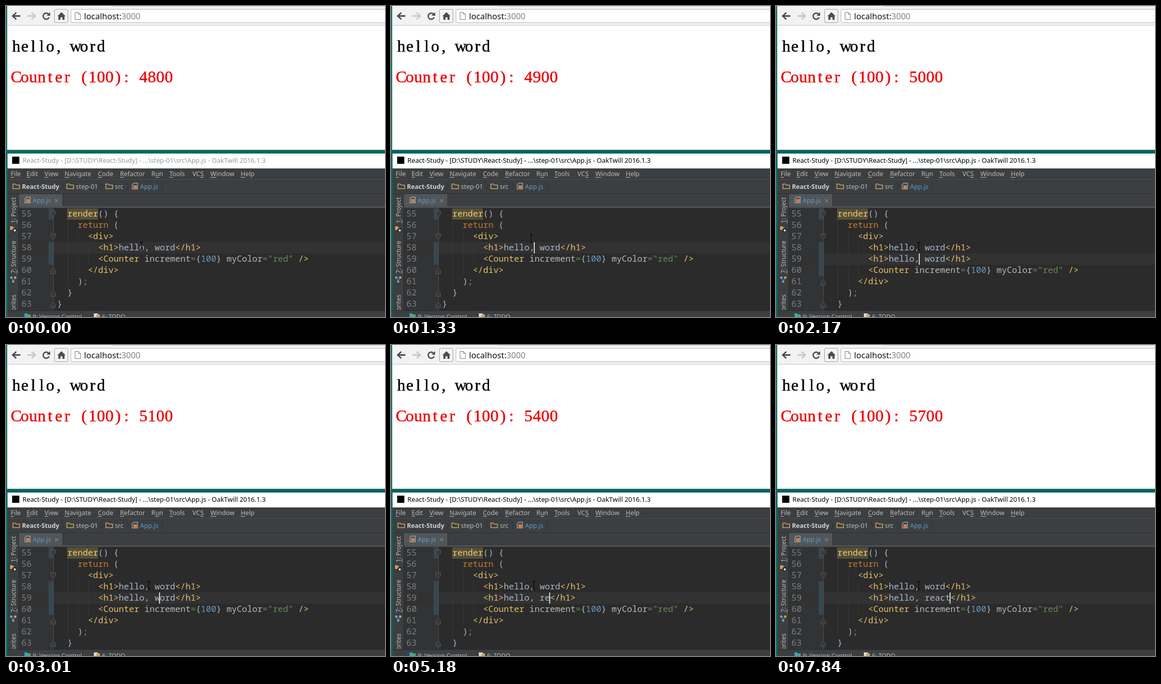
An HTML page with a canvas for the animation above (8 s loop, 738x607 px).

```html
<!DOCTYPE html>
<html lang="en">
<head>
<meta charset="utf-8">
<title>Live reload</title>
<style>
  html, body { margin: 0; width: 100%; height: 100%; overflow: hidden; }
  canvas { display: block; }
</style>
</head>
<body>
<canvas id="stage" width="738" height="607"></canvas>
<script>
const ctx = document.getElementById('stage').getContext('2d');
const LOOP = 8000, STEP = 70;
const UI = '"Noto Sans", sans-serif', MONO = '"Noto Sans Mono", monospace';
const ROW = 22, TOP = 395, COL = 10, LEFT = 100;
const FOCUS = 1330, DUPLICATE = 2170;

const counterTimes = [700, 1610, 2520, 3430, 4270, 5180, 6090, 6930, 7840];
const caretTimes = [2870, 3010, 3150, 3290, 3360];
const words = [[0, 'word'], [3850, 'wor'], [4060, 'wo'], [4200, 'w'], [4410, ''],
  [4900, 'r'], [5110, 're'], [5810, 'rea'], [6090, 'reac'], [6440, 'react']];
const mousePath = [[0, 264, 468], [140, 264, 468], [350, 205, 250], [490, 150, 85], [560, 143, 56],
  [630, 143, 56], [700, 179, 110], [910, 200, 200], [1190, 262, 425], [1400, 278, 469], [LOOP, 278, 469]];

const INK = { tag: '#e8bf6a', text: '#a9b7c6', key: '#cc7832', fn: '#ffc66d',
  attr: '#bababa', num: '#6897bb', str: '#6a8759' };

const passed = (times, t) => times.filter(at => at <= t).length;

function rect(x, y, w, h, fill) {
  ctx.fillStyle = fill;
  ctx.fillRect(x, y, w, h);
}

function text(str, x, y, fill, font) {
  ctx.font = font;
  ctx.fillStyle = fill;
  ctx.fillText(str, x, y);
  return ctx.measureText(str).width;
}

function path(d, x, y, { fill, stroke, width = 1 }) {
  const p = new Path2D(d);
  ctx.save();
  ctx.translate(x, y);
  if (fill) { ctx.fillStyle = fill; ctx.fill(p); }
  if (stroke) { ctx.strokeStyle = stroke; ctx.lineWidth = width; ctx.stroke(p); }
  ctx.restore();
}

// Label with one underlined mnemonic letter
function label(str, x, y, mark, size = 12.4) {
  const font = size + 'px ' + UI;
  text(str, x, y, '#bbbbbb', font);
  const from = ctx.measureText(str.slice(0, mark)).width;
  rect(x + from, y + 2, ctx.measureText(str[mark]).width, 1, '#bbbbbb');
}

function sideLabel(str, y, mark) {
  ctx.save();
  ctx.translate(19, y);
  ctx.rotate(-Math.PI / 2);
  label(str, 0, 0, mark, 11.7);
  ctx.restore();
}

// Fixed pitch serif lettering, one glyph centred in each cell
function heading(str, y, fill) {
  ctx.textAlign = 'center';
  ctx.strokeStyle = fill;
  ctx.lineWidth = 0.5;
  [...str].forEach((ch, i) => {
    const x = 20 + i * 16.5;
    text(ch, x, y, fill, '32px "Liberation Serif", serif');
    ctx.strokeText(ch, x, y);
  });
  ctx.textAlign = 'left';
}

function folder(x) {
  path('M.5 2.5H5L7 4.500H13.500V11.500H.5Z', x, 345, { stroke: '#c9a36a', width: 1.6 });
}

function scriptIcon(x, y) {
  path('M4 .7H11.300V12.300H.7V4Z', x, y, { stroke: '#8fa3ad', width: 1.4 });
  rect(x + 3, y + 5, 7, 6, '#e07b39');
}

function browser(t) {
  rect(0, 0, 738, 39, '#f2f2f2');
  rect(0, 0, 210, 1, '#fafafa');
  rect(208, 0, 530, 1, '#d6c8c8');
  rect(0, 37, 738, 1, '#cfcfcf');
  rect(0, 39, 738, 242, '#ffffff');

  path('M7 0L0 6.500L7 13M1 6.500H15', 13, 13, { stroke: '#4d4d4d', width: 2.8 });
  path('M8 0L15 6.500L8 13M14 6.500H0', 42, 13, { stroke: '#c8c8c8', width: 2.8 });
  path('M12 3A6 6 0 1 0 13 9', 71, 13, { stroke: '#4d4d4d', width: 2.6 });
  path('M15 -1V6H8Z', 71, 13, { fill: '#4d4d4d' });
  path('M3 .5H24Q26.500 .5 26.500 3V24Q26.500 26.500 24 26.500H3Q.5 26.500 .5 24V3Q.5 .5 3 .5Z',
    94, 6, { fill: '#f4f4f4', stroke: '#a0a0a0' });
  path('M8 0L16 8H14V15H10V10H6V15H2V8H0Z', 100, 12, { fill: '#4d4d4d' });
  path('M620 .5H3Q.5 .5 .5 3V24Q.5 26.500 3 26.500H620', 126, 6, { fill: '#ffffff', stroke: '#b8b8b8' });
  path('M.5 .5H7L11 4.500V14.500H.5ZM7 .5V4.500H11', 134, 12, { stroke: '#777777' });
  const w = text('localhost:', 152, 26, '#111111', '16.2px ' + UI);
  text('3000', 152 + w, 26, '#808080', '16.2px ' + UI);

  heading('hello, word', 89, '#000000');
  heading('Counter (100): ' + (4800 + 100 * passed(counterTimes, t)), 149, '#f00000');
}

function frame(t) {
  const focused = t >= FOCUS;
  const teal = focused ? '#046361' : '#0b6b5a';
  rect(0, 281, 738, 7, teal);
  rect(3, 280, 735, 1, '#b9cfcb');
  rect(0, 0, 2, 607, '#0a6f62');
  rect(2, 0, 1, 281, '#b5cfca');
  rect(2, 281, 1, 326, teal);

  rect(3, 288, 735, 29, '#ffffff');
  rect(12, 294, 14, 14, '#000000');
  text('React-Study - [D:\\STUDY\\React-Study] - ...\\step-01\\src\\App.js - OakTwill 2016.1.3',
    32, 306, focused ? '#000000' : '#999999', '12.8px ' + UI);

  rect(3, 317, 735, 290, '#3c3f41');
  const menu = [['File', 9], ['Edit', 40], ['View', 75], ['Navigate', 114], ['Code', 179], ['Refactor', 222],
    ['Run', 283, 1], ['Tools', 318], ['VCS', 363, 2], ['Window', 398], ['Help', 457]];
  for (const [name, x, mark = 0] of menu) label(name, x, 332, mark);
  rect(3, 339, 735, 1, '#555555');
  rect(3, 340, 735, 1, '#2e3032');

  [13, 118, 194].forEach(folder);
  scriptIcon(245, 345);
  text('React-Study', 31, 357, '#d0d0d0', 'bold 12.2px ' + UI);
  text('step-01', 136, 357, '#bbbbbb', '12.4px ' + UI);
  text('src', 212, 357, '#bbbbbb', '12.4px ' + UI);
  text('App.js', 261, 357, '#5a9bcf', '12.4px ' + UI);
  for (const x of [108, 185, 235, 302]) path('M0 0L4 7L0 14', x, 345, { stroke: '#2b2d2f' });
  rect(3, 366, 735, 1, '#2e3032');
}

function sideBar() {
  rect(24, 367, 1, 227, '#2b2b2b');
  sideLabel('1: Project', 424, 0);
  path('M0 0H5L6 2H8V7H0Z', 8, 430, { fill: '#c9a36a' });
  rect(13, 434, 7, 7, '#1d1d1d');
  rect(15, 436, 4, 4, '#d8d8d8');
  sideLabel('7: Structure', 522, 0);
  path('M3 3L7 10L11 3M3 3H7', 7, 527, { stroke: '#9a9a9a' });
  rect(8, 528, 4, 4, '#5aa7d6');
  rect(16, 528, 4, 4, '#d9a45b');
  rect(12, 536, 4, 4, '#5aa7d6');
  ctx.save();
  ctx.beginPath();
  ctx.rect(3, 550, 21, 43);
  ctx.clip();
  sideLabel('2: Favorites', 626, 0);
  ctx.restore();
}

function codeRows(t, word) {
  const title = w => [8, 'tag', '<h1>', 'text', 'hello, ' + w, 'tag', '</h1>'];
  return [
    [2, 'fn', 'render', 'text', '() {'],
    [4, 'key', 'return', 'text', ' ('],
    [6, 'tag', '<div>'],
    title('word'),
    ...(t >= DUPLICATE ? [title(word)] : []),
    [8, 'tag', '<Counter ', 'attr', 'increment', 'str', '=', 'text', '{', 'num', '100', 'text', '} ',
      'attr', 'myColor', 'str', '="red"', 'tag', ' />'],
    [6, 'tag', '</div>'],
    [4, 'text', ')', 'key', ';'],
    [2, 'text', '}'],
    [0, 'text', '}'],
  ];
}

function foldMark(row, closing) {
  const y = TOP + row * ROW;
  const d = closing ? 'M.5 4.500L5 .5L9.500 4.500V10.500H.5ZM3 7H7' : 'M.5 .5H9.500V6.500L5 10.500L.5 6.500ZM3 4H7';
  path(d, 87, y + (closing ? 7 : 5), { fill: '#313335', stroke: '#5c5e60' });
}

function editor(t) {
  const shift = t >= DUPLICATE ? 1 : 0;
  const word = words.filter(([at]) => at <= t).pop()[1];
  const font = '16.667px ' + MONO;

  rect(25, 367, 85, 24, '#515658');
  rect(110, 367, 1, 24, '#2b2d2f');
  rect(25, 391, 713, 3, '#4e5254');
  scriptIcon(36, 372);
  text('App.js', 52, 384, '#5a9bcf', '12.4px ' + UI);
  path('M0 0L6 6M6 0L0 6', 95.5, 377, { stroke: '#7f8385', width: 1.2 });

  rect(25, 394, 713, 200, '#2b2b2b');
  rect(25, 394, 68, 200, '#313335');
  const activeY = TOP + (3 + shift) * ROW;
  rect(25, activeY, 713, ROW, '#323232');
  rect(83, TOP, 9, ROW, '#374752');
  rect(83, TOP + 3 * ROW, 9, (2 + shift) * ROW, '#374752');
  rect(92, TOP, 1, 199, '#4c4f51');

  rect(120, 417, 1, (6 + shift) * ROW, '#373737');
  rect(140, 439, 1, (4 + shift) * ROW, '#373737');
  rect(160, 461, 1, (2 + shift) * ROW, '#373737');
  rect(119, TOP, 60, ROW, '#52503a');

  codeRows(t, word).forEach(([indent, ...spans], row) => {
    const y = TOP + row * ROW + 15.5;
    if (row < 9) text(String(55 + row), 30, y, '#7b7e80', font);
    let x = LEFT - 0.5 + indent * COL;
    for (let i = 0; i < spans.length; i += 2) {
      text(spans[i + 1], x, y, INK[spans[i]], font);
      x += spans[i + 1].length * COL;
    }
  });

  foldMark(0);
  foldMark(2);
  [5, 7, 8].forEach(row => foldMark(row + shift, true));

  if (t >= 6370 && t < 6790) {
    ctx.beginPath();
    for (let x = 289; x <= 329; x += 2) ctx.lineTo(x, x % 4 === 1 ? 504.5 : 502.5);
    ctx.strokeStyle = '#659c6b';
    ctx.lineWidth = 1;
    ctx.stroke();
  }
  if (t >= FOCUS) {
    const col = t < 3850 ? 18 + passed(caretTimes, t) : 19 + word.length;
    rect(LEFT + col * COL - 2, activeY, 2, ROW, '#d0d0d0');
  }
}

function statusBar() {
  rect(3, 594, 735, 13, '#3c3f41');
  rect(3, 594, 735, 1, '#2b2b2b');
  rect(36, 600, 6, 7, '#3f9fd0');
  rect(42, 602, 6, 5, '#4eab68');
  label('9: Version Control', 52, 610, 0, 11.5);
  path('M0 0H7L10 3V8H0Z', 171, 600, { fill: '#d8d8d8' });
  rect(176, 602, 7, 5, '#c9a36a');
  label('6: TODO', 187, 610, 0, 11.5);
}

function pointer(t) {
  const now = Math.floor(t / STEP) * STEP;
  const i = mousePath.findIndex(([at]) => at > now);
  const [t0, x0, y0] = mousePath[i - 1], [t1, x1, y1] = mousePath[i];
  const k = (now - t0) / (t1 - t0);
  const x = Math.round(x0 + (x1 - x0) * k), y = Math.round(y0 + (y1 - y0) * k);
  if (y > TOP) {
    path('M-3 -7.500H-1L0 -6.500L1 -7.500H3M0 -6.500V6.500M-3 7.500H-1L0 6.500L1 7.500H3', x, y,
      { stroke: '#0c0c0c', width: 1.3 });
  } else {
    path('M.5 .5V16.500L4 13L6.500 18.500L9 17.500L6.500 12H11.500Z', x - 1, y, { fill: '#ffffff', stroke: '#222233' });
  }
}

function draw() {
  const t = performance.now() % LOOP;
  browser(t);
  frame(t);
  sideBar();
  editor(t);
  statusBar();
  pointer(t);
  requestAnimationFrame(draw);
}
draw();
</script>
</body>
</html>
```
